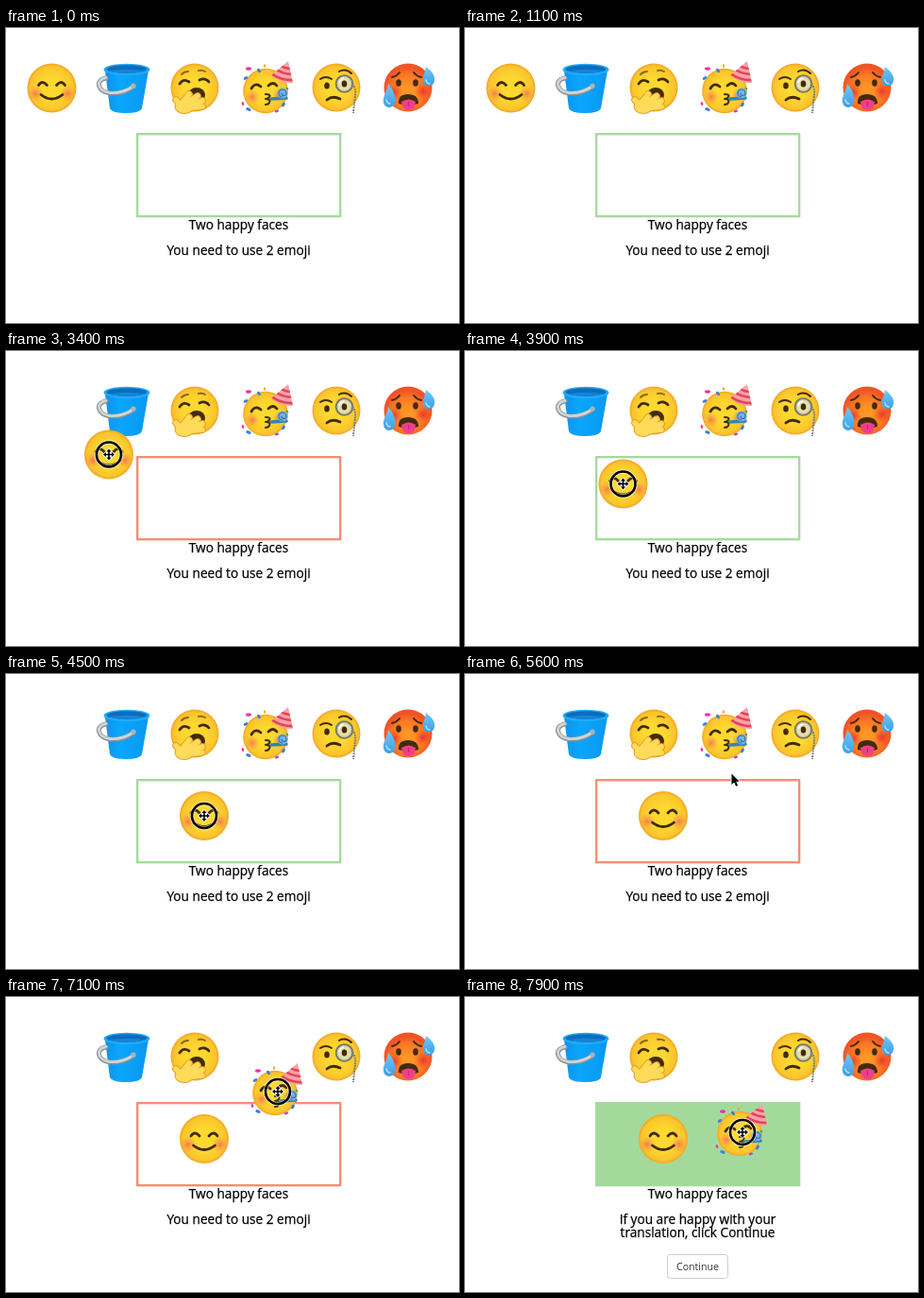
An HTML page that plays this animation: 480x312 px, repeating every 8000 ms.

```html
<!DOCTYPE html>
<html lang="en">
<head>
<meta charset="utf-8">
<title>Emoji translation</title>
<style>
html, body { margin: 0; width: 100%; height: 100%; overflow: hidden; background: #fff; }
svg { display: block; width: 480px; height: 312px; }
text { font-family: "Open Sans", "Noto Sans", sans-serif; font-size: 13.65px; text-anchor: middle; }
.label { stroke: #000; stroke-width: .25px; }
.ink { fill: none; stroke: #422b0d; stroke-width: 2.8; stroke-linecap: round; stroke-linejoin: round; }
.thin { stroke-width: 2; }
.dark { fill: #422b0d; }
.round { fill: none; stroke-linecap: round; stroke-linejoin: round; }
</style>
</head>
<body>
<svg viewBox="0 0 480 312">
  <defs>
    <radialGradient id="skin">
      <stop offset=".4" stop-color="#fdd92f"/>
      <stop offset=".88" stop-color="#fac52c"/>
      <stop offset="1" stop-color="#f4a223"/>
    </radialGradient>
    <radialGradient id="heat" cy=".58">
      <stop offset=".2" stop-color="#ff9626"/>
      <stop offset=".7" stop-color="#fb7823"/>
      <stop offset="1" stop-color="#ef5426"/>
    </radialGradient>
    <radialGradient id="cheek">
      <stop offset=".1" stop-color="#f4764e" stop-opacity=".8"/>
      <stop offset="1" stop-color="#f9a04a" stop-opacity="0"/>
    </radialGradient>
    <radialGradient id="flush">
      <stop offset=".1" stop-color="#ea2f30" stop-opacity=".8"/>
      <stop offset="1" stop-color="#f04a2a" stop-opacity="0"/>
    </radialGradient>
    <linearGradient id="pail">
      <stop offset="0" stop-color="#0c93ec"/>
      <stop offset=".35" stop-color="#0aa6fd"/>
      <stop offset="1" stop-color="#0a98f0"/>
    </linearGradient>
    <linearGradient id="drop" x2="0" y2="1">
      <stop offset="0" stop-color="#72c8f6"/>
      <stop offset="1" stop-color="#3d9fe6"/>
    </linearGradient>
    <clipPath id="cone"><path d="M6-13 24-28 29-5Q17-4 6-13Z"/></clipPath>
    <path id="bail" d="M-20-10C-32-8-29 4-16 6Q-2 7 9-1"/>
    <path id="fingers" d="M-14 17-6 7M-12 18 3 9M-10 20 8 14M-9 22 8 20M-15 18-20 13"/>
  </defs>

  <rect id="box" x="139.2" y="112.2" width="215" height="87" stroke-width="2.3"/>

  <!-- bucket -->
  <g transform="translate(126 63)">
    <path d="M-21-18-16 22Q-14 27 1 27T18 22L25-18Z" fill="url(#pail)"/>
    <ellipse cx="2" cy="-19" rx="24.500" ry="6.300" fill="#22abfb"/>
    <ellipse cx="2" cy="-19.500" rx="21.500" ry="4.300" fill="#0d6cbc"/>
    <path d="M-18-17.500Q2-21 22-17.500 2-13-18-17.500Z" fill="#1584d8"/>
    <use href="#bail" class="round" stroke="#8b9396" stroke-width="5"/>
    <use href="#bail" class="round" stroke="#cfd5d7" stroke-width="2.800" y="-.5"/>
    <circle cx="9" cy="-2" r="2.600" fill="#aab4b8"/>
  </g>

  <!-- yawning face -->
  <g transform="translate(200 63)">
    <circle r="25.500" fill="url(#skin)"/>
    <path class="ink" d="M-16-4Q-12-10-6-6M5-8Q11-11 15-6"/>
    <path class="ink thin" d="M-14-14Q-11-17-7-17M4-18Q8-19 11-17" stroke-opacity=".6"/>
    <ellipse cx="2" cy="8" rx="9" ry="8" class="dark"/>
    <ellipse cx="-11" cy="20" rx="10.500" ry="8" fill="#e59f28"/>
    <use href="#fingers" class="round" stroke="#e59f28" stroke-width="7.600"/>
    <use href="#fingers" class="round" stroke="#fedb58" stroke-width="5.600"/>
    <ellipse cx="-11" cy="20" rx="9.500" ry="7" fill="#fedb58"/>
  </g>

  <!-- monocle face -->
  <g transform="translate(350 63)">
    <circle r="25.500" fill="url(#skin)"/>
    <path class="ink thin" d="M-17-9Q-11-13-5-9M3-17Q10-21 16-15"/>
    <ellipse cx="-10" cy="-2" rx="2.800" ry="3.600" class="dark"/>
    <path class="ink" d="M-10 13Q-4 8 4 12"/>
    <circle cx="8.500" cy="-4" r="8.800" fill="#e6dfae" stroke="#77786a" stroke-width="2"/>
    <circle cx="8.500" cy="-4" r="7.300" fill="none" stroke="#c9c59c" stroke-width="1"/>
    <ellipse cx="8.500" cy="-4" rx="2.800" ry="3.600" class="dark"/>
    <path d="M3-5Q4-9 8-10" fill="none" stroke="#fff" stroke-width="1.400"/>
    <path d="M17-4Q21 0 20 8T18 27" fill="none" stroke="#7b8078" stroke-width="2" stroke-dasharray="2 .8"/>
  </g>

  <!-- hot face -->
  <g transform="translate(426 63)">
    <circle r="25.500" fill="url(#heat)"/>
    <circle cx="-15" cy="5" r="9" fill="url(#flush)"/>
    <circle cx="16" cy="4" r="9" fill="url(#flush)"/>
    <path class="ink thin" d="M-17-11Q-12-12-9-16M6-16Q9-12 14-11"/>
    <ellipse cx="-10" cy="-5" rx="2.800" ry="3.700" class="dark"/>
    <ellipse cx="8" cy="-5" rx="2.800" ry="3.700" class="dark"/>
    <path d="M-10 17Q-11 7 0 7T11 17Q0 20-10 17Z" class="dark"/>
    <path d="M-7 15Q1 10 8 15L7 20Q6 24 1 24T-6 20Z" fill="#ef3f8b"/>
    <path d="M.5 15V20" stroke="#c9256f" stroke-width="1.200"/>
    <path d="M19-22C27-16 29-11 28-7A6.200 6.200 0 0 1 16-6C15-11 18-15 19-22Z" fill="url(#drop)"/>
    <path d="M-21-4C-14 4-13 10-14 15A6 6 0 0 1-26 15C-27 9-22 4-21-4Z" fill="url(#drop)"/>
    <path class="round" d="M19-8Q20-4 23-4M-23 13Q-22 17-19 17" stroke="#b9e6ff" stroke-width="1.300"/>
  </g>

  <g id="party">
    <circle cy="3.500" r="23.800" fill="url(#skin)"/>
    <circle cx="-14" cy="10" r="8" fill="url(#cheek)"/>
    <circle cx="14" cy="8" r="7" fill="url(#cheek)"/>
    <path class="ink" d="M-15 1Q-11-6-5-1M3-2Q8-7 12-2"/>
    <path class="ink thin" d="M0 7Q6 7 4 10 3 12 0 12 6 12 4 16 3 18 0 18"/>
    <path class="round" d="M6 12 22 11" stroke="#2d87b5" stroke-width="3.600"/>
    <circle cx="18" cy="6" r="5.600" fill="#75b3e3"/>
    <path class="round" d="M18 10A4 4 0 1 1 22 6 2.400 2.400 0 1 1 17 6" stroke="#3e6fae" stroke-width="1.200"/>
    <g clip-path="url(#cone)">
      <path d="M4-10 24-30 32-2H14Z" fill="#f7a2a8"/>
      <path d="M5-16Q16-7 32-8M10-20Q18-14 30-14M15-24Q20-20 28-20" fill="none" stroke="#e6435a" stroke-width="2.600"/>
    </g>
    <g id="confetti"></g>
  </g>

  <g id="blush">
    <circle r="26" fill="url(#skin)"/>
    <circle cx="-17" cy="6" r="9" fill="url(#cheek)"/>
    <circle cx="17" cy="6" r="9" fill="url(#cheek)"/>
    <path class="ink" d="M-14-3Q-10-9-5-3M5-3Q10-9 14-3M-11.500 7Q0 16 11.500 7"/>
  </g>

  <text class="label" x="246.500" y="212.900">Two happy faces</text>
  <text class="label" id="hint" x="246.500" y="239.900">You need to use 2 emoji</text>
  <g id="done">
    <text class="label" x="246.500" y="239.900">If you are happy with your</text>
    <text class="label" x="246.500" y="253.500">translation, click Continue</text>
    <rect x="214.500" y="272.500" width="64" height="25" rx="3" fill="#fff" stroke="#ccc"/>
    <text x="246.500" y="288.900" fill="#333" style="font-size:10.6px">Continue</text>
  </g>

  <g id="cursor">
    <g id="ring" fill="none">
      <circle r="13" stroke="#fff" stroke-width="4.400" opacity=".6"/>
      <circle r="13" stroke="#000" stroke-width="2.600"/>
    </g>
    <path id="move" d="M0-6 2.600-3H.8V-.8H3V-2.600L6 0 3 2.600V.8H.8V3H2.600L0 6-2.600 3H-.8V.8H-3V2.600L-6 0-3-2.600V-.8H-.8V-3H-2.600Z" stroke="#fff" stroke-width="1.800" paint-order="stroke"/>
    <path id="arrow" d="M0 0V11.500L2.700 9 4.600 13.300 6.700 12.400 4.800 8.200H8.200Z" stroke="#fff" stroke-width="1.600" paint-order="stroke"/>
  </g>
</svg>
<script>
const LOOP = 8000, STEP = 100;
const GREEN = '#a3da9c', ORANGE = '#f18e72';
const $ = id => document.getElementById(id);

// time, x, y of the pointer
const PATH = [
  [1600, 110, 272], [1900, 82, 185], [2200, 54, 86], [2400, 47, 63], [2800, 47, 63],
  [3000, 61, 75], [3400, 109, 109.500], [3600, 128, 124], [3900, 167.500, 140.500], [4200, 197, 149],
  [4500, 210, 150], [4900, 210, 150], [5200, 236, 139], [5600, 282.500, 105.500],
  [5900, 281, 82], [6200, 278, 65], [6700, 278, 65], [7100, 288, 100],
  [7500, 293, 131], [7900, 294, 143]
];

// x, y, size, colour
const FLECKS = [
  [-18, -20, 3, '#f0349b'], [-7, -18, 2.500, '#3c7fe0'], [-1, -23, 1.800, '#f5a623'],
  [-21, -10, 2.500, '#3c7fe0'], [-18, 23, 2.800, '#3c7fe0'], [-24, 17, 2, '#f0349b'],
  [19, 18, 2.600, '#2f7fe0'], [12, 25, 2.200, '#a84ddb'], [23, 1, 1.600, '#43a047']
];
$('confetti').innerHTML = FLECKS.map(([x, y, r, c], i) =>
  `<ellipse rx="${r}" ry="${r * .6}" fill="${c}" transform="translate(${x} ${y}) rotate(${i * 50})"/>`).join('');

function pointer(t) {
  const i = PATH.findIndex(p => p[0] > t);
  if (i < 0) return PATH[PATH.length - 1].slice(1);
  if (i === 0) return PATH[0].slice(1);
  const a = PATH[i - 1], b = PATH[i], k = (t - a[0]) / (b[0] - a[0]);
  return [a[1] + (b[1] - a[1]) * k, a[2] + (b[2] - a[2]) * k];
}

const place = (id, x, y) => $(id).setAttribute('transform', `translate(${x} ${y})`);
const show = (id, on) => $(id).setAttribute('display', on ? 'inline' : 'none');

function draw(t) {
  const [x, y] = pointer(t);
  const blush = t < 2900 ? [48.500, 63.500] : t < 4500 ? [x, y] : [210, 150];
  const party = t < 6700 ? [275, 63] : [x - 3, y - 2];
  place('blush', ...blush);
  place('party', ...party);

  const solved = t >= 7300;
  const orange = t >= 2900 && t < 3700 || t >= 4600 && !solved;
  const color = orange ? ORANGE : GREEN;
  $('box').setAttribute('stroke', color);
  $('box').setAttribute('fill', solved ? color : 'none');
  show('hint', !solved);
  show('done', solved);

  const over = [blush, party].some(([cx, cy]) => Math.hypot(x - cx, y - cy) < 27);
  place('cursor', x, y);
  show('cursor', t >= 1600);
  show('ring', t >= 2800 && t < 4800 || t >= 6600);
  show('move', over);
  show('arrow', !over);
}

const start = performance.now();
function tick() {
  const t = (performance.now() - start) % LOOP;
  draw(Math.floor(t / STEP) * STEP);
  requestAnimationFrame(tick);
}
tick();
</script>
</body>
</html>
```
